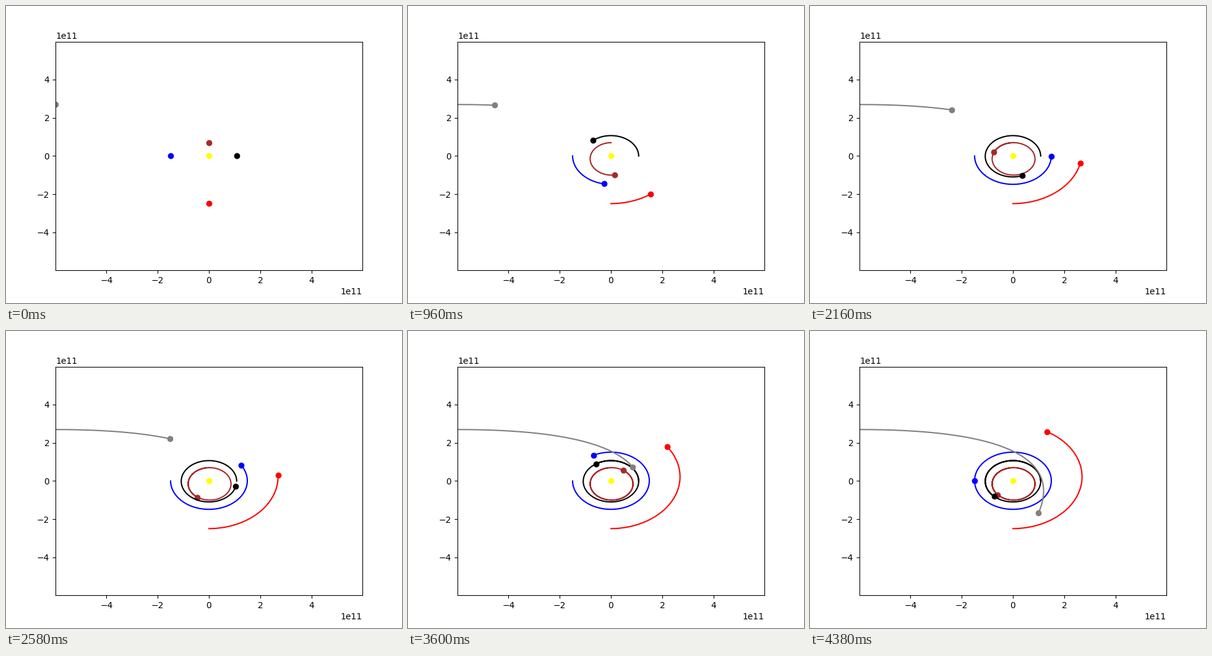
Write a matplotlib script that moves like this. It is 640 by 480 pixels and loops after 4.44 s.

```python
import numpy as np
import matplotlib.pyplot as plt
from matplotlib.animation import FuncAnimation

AU = 149.6e9
GM = 6.67408e-11 * 1.9885e30
DAY = 86400.0
DAYS_PER_FRAME = 5
FRAMES = 74

# colour, start position (AU), start velocity (m/s)
BODIES = [
    ("brown", (0, 0.466), (-47.36e3, 0)),
    ("black", (0.723, 0), (0, 35.02e3)),
    ("blue", (-1, 0), (0, -29.783e3)),
    ("red", (0, -1.666), (24.0e3, 0)),
    ("gray", (-4, 1.8), (20.0e3, 0)),
]


def orbit(start, velocity, days):
    """Daily positions around a fixed sun, semi-implicit Euler."""
    pos = np.array(start, dtype=float) * AU
    vel = np.array(velocity, dtype=float)
    path = [pos.copy()]
    for _ in range(days):
        vel -= GM * pos / np.hypot(*pos) ** 3 * DAY
        pos += vel * DAY
        path.append(pos.copy())
    return np.array(path)


fig, ax = plt.subplots(figsize=(6.4, 4.8), dpi=100)
ax.set_xlim(-4 * AU, 4 * AU)
ax.set_ylim(-4 * AU, 4 * AU)
ax.plot([0], [0], "o", color="yellow")

paths, trails, dots = [], [], []
for color, start, velocity in BODIES:
    paths.append(orbit(start, velocity, DAYS_PER_FRAME * (FRAMES - 1)))
    trails.append(ax.plot([], [], color=color)[0])
    dots.append(ax.plot([], [], "o", color=color)[0])


def update(frame):
    day = frame * DAYS_PER_FRAME
    for path, trail, dot in zip(paths, trails, dots):
        trail.set_data(path[:day + 1, 0], path[:day + 1, 1])
        dot.set_data(path[day:day + 1, 0], path[day:day + 1, 1])
    return trails + dots


anim = FuncAnimation(fig, update, frames=FRAMES, interval=60,
                     repeat=True, repeat_delay=0, blit=False)
plt.show()
```
